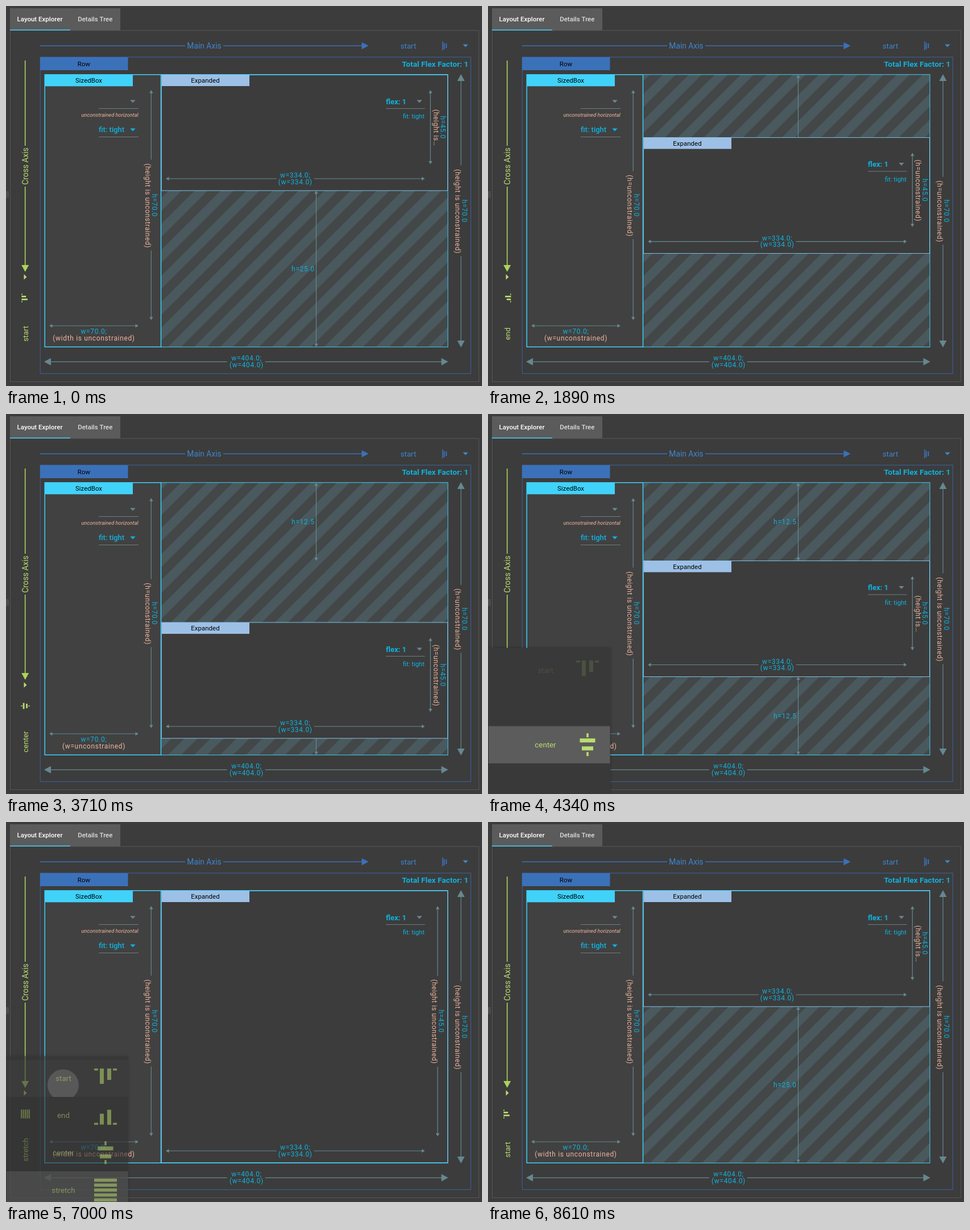
Recreate the animation shown at these times as an HTML page with a canvas. Size 837 by 669 pixels, loop 8.68 s.

```html
<!DOCTYPE html>
<html lang="en">
<head>
<meta charset="utf-8">
<title>Layout Explorer</title>
<style>
html, body { margin: 0; width: 100%; height: 100%; overflow: hidden; background: #3c3c3c; }
canvas { display: block; width: 837px; height: 669px; }
</style>
</head>
<body>
<canvas id="stage" width="837" height="669"></canvas>
<script>
const ctx = document.getElementById('stage').getContext('2d');
const LOOP = 8680, BEAT = 70, CHANGE = 400, MENU = 300;
const BG = '#3c3c3c', BLUE = '#3b71b9', AXIS = '#3d86cf', CYAN = '#0fb2de', BRIGHT = '#3fd0f8',
  SLATE = '#668890', PEACH = '#efb59e', GREEN = '#aad35c', LIME = '#badd70', EDGE = '#7cc3e9';
const TOP = 121, BOTTOM = 600, CHILD = 204, GAP = BOTTOM - TOP - CHILD;

const options = ['start', 'end', 'center', 'stretch'];
const spans = [[TOP, TOP + CHILD], [TOP + GAP, BOTTOM], [TOP + GAP / 2, BOTTOM - GAP / 2], [TOP, BOTTOM]];
// each step: menu opens, an option is tapped, the layout moves
const steps = [
  { open: 445, tap: 1390, move: 1704, from: 0, to: 1 },
  { open: 2300, tap: 3250, move: 3560, from: 1, to: 2 },
  { open: 4157, tap: 5105, move: 5414, from: 2, to: 3 },
  { open: 6010, tap: 6964, move: 7275, from: 3, to: 0 }
];

const clamp = v => Math.max(0, Math.min(1, v));
const ramp = (v, a, b) => clamp((v - a) / (b - a));
const mix = (a, b, k) => a + (b - a) * k;
const ease = x => x < .5 ? 4 * x ** 3 : 1 - (2 - 2 * x) ** 3 / 2;

function rect(x0, y0, x1, y1, color) {
  ctx.fillStyle = color;
  ctx.fillRect(x0, y0, x1 - x0, y1 - y0);
}

function frame(x0, y0, x1, y1, color, w = 1) {
  ctx.strokeStyle = color;
  ctx.lineWidth = w;
  ctx.strokeRect(x0, y0, x1 - x0, y1 - y0);
}

function line(x0, y0, x1, y1, color, w = 1.2) {
  ctx.strokeStyle = color;
  ctx.lineWidth = w;
  ctx.beginPath();
  ctx.moveTo(x0, y0);
  ctx.lineTo(x1, y1);
  ctx.stroke();
}

// triangle with its tip at x, y, pointing along dx, dy
function tip(x, y, dx, dy, len, half, color) {
  const bx = x - dx * len, by = y - dy * len;
  ctx.fillStyle = color;
  ctx.beginPath();
  ctx.moveTo(x, y);
  ctx.lineTo(bx - dy * half, by + dx * half);
  ctx.lineTo(bx + dy * half, by - dx * half);
  ctx.fill();
}

const caret = (x, y, color) => tip(x, y + 2.5, 0, 1, 5, 4.7, color);

function text(s, x, y, size, color, { align = 'center', weight = 400, style = '', space = 0, turn = 0 } = {}) {
  ctx.save();
  ctx.translate(x, y);
  ctx.rotate(turn * Math.PI / 2);
  ctx.font = `${style} ${weight} ${size}px Roboto, sans-serif`;
  ctx.letterSpacing = space + 'px';
  ctx.textAlign = align;
  ctx.fillStyle = color;
  ctx.fillText(s, 0, size * .36);
  ctx.restore();
}

const dim = (s, x, y, color, turn = 0) => text(s, x, y, 12, color, { space: .65, turn });

function dimWidth(s) {
  ctx.font = '400 12px Roboto, sans-serif';
  ctx.letterSpacing = '.65px';
  return ctx.measureText(s).width;
}

// double arrow with an optional gap around its middle
function vArrow(x, y0, y1, gap = 0, big = false) {
  const [len, half] = big ? [12, 6.5] : [5.5, 3.3], mid = (y0 + y1) / 2;
  line(x, y0 + 3, x, mid - gap, SLATE);
  line(x, mid + gap, x, y1 - 3, SLATE);
  tip(x, y0, 0, -1, len, half, SLATE);
  tip(x, y1, 0, 1, len, half, SLATE);
}

function hArrow(x0, x1, y, gap = 0, big = false) {
  const [len, half] = big ? [12, 6.5] : [5.5, 3.3], mid = (x0 + x1) / 2;
  line(x0 + 3, y, mid - gap, y, SLATE);
  line(mid + gap, y, x1 - 3, y, SLATE);
  tip(x0, y, -1, 0, len, half, SLATE);
  tip(x1, y, 1, 0, len, half, SLATE);
}

function vLabel(x, y, size, note) {
  dim('h=' + size, x + 6.5, y, CYAN, 1);
  dim(note, x - 6, y + .7, PEACH, 1);
}

function hLabel(x, y, size, note, color) {
  dim(`w=${size};`, x, y - 6, CYAN);
  dim(note, x, y + 5.7, color);
}

// icons on a 40 unit square, centred at 0, 0
const icons = [
  [[-20, -17, 7, 3.5], [13, -17, 7, 3.5], [-10, -17, 7, 27], [3, -17, 7, 20]],
  [[-20, 13, 7, 3.5], [13, 13, 7, 3.5], [-10, -3, 7, 19], [3, -10, 7, 26.5]],
  [[-1.8, -20, 3.6, 7], [-1.8, 13, 3.6, 7], [-13.5, -11, 27, 7], [-10, 3, 20, 7]],
  [0, 1, 2, 3, 4].map(i => [-20, -20 + i * 8.7, 40, 5.5])
];

function icon(kind, x, y, scale, turn, color) {
  ctx.save();
  ctx.translate(x, y);
  ctx.rotate(turn * Math.PI / 2);
  ctx.scale(scale, scale);
  ctx.fillStyle = color;
  for (const bar of icons[kind]) ctx.fillRect(...bar);
  ctx.restore();
}

function chrome() {
  rect(0, 0, 837, 669, BG);
  frame(7.5, 43, 831.5, 661.5, '#565656');
  rect(7, 4, 201, 43, '#5b5b5b');
  rect(7, 41.5, 113, 43, BRIGHT);
  text('Layout Explorer', 59.5, 23, 11.5, '#fff', { weight: 500 });
  text('Details Tree', 156.8, 23, 11.5, '#dedede', { weight: 500 });
  rect(0, 326, 1, 338, '#6a6a6a');
  rect(3, 326, 4, 338, '#6a6a6a');
}

function mainAxis() {
  line(60, 70, 315, 70, BLUE, 1.6);
  line(382, 70, 627, 70, BLUE, 1.6);
  tip(637.5, 70, 1, 0, 12, 6.3, BLUE);
  text('Main Axis', 348.5, 70, 13.8, AXIS);
  text('start', 707.5, 70, 13.2, AXIS);
  rect(767, 62, 768.5, 78, BLUE);
  rect(769.5, 65, 771.5, 76, BLUE);
  rect(773.3, 66, 775.3, 74, BLUE);
  caret(808, 70, AXIS);
}

function crossAxis(kind) {
  line(33.7, 96, 33.7, 246, GREEN, 1.6);
  line(33.7, 318, 33.7, 458, GREEN, 1.6);
  tip(33.7, 468, 0, 1, 12, 6.5, GREEN);
  text('Cross Axis', 34, 282, 13.8, LIME, { turn: -1 });
  tip(36.5, 477, 1, 0, 5, 4.7, LIME);
  icon(kind, 34, 514, .39, -1, LIME);
  text(options[kind], 34, 577, 13.3, LIME, { turn: -1 });
}

function row(note) {
  frame(60.2, 90, 817.2, 647.2, '#3864a3');
  rect(60, 90, 214.5, 113, BLUE);
  text('Row', 137, 101.7, 11.5, '#000');
  text('Total Flex Factor: 1', 813, 101.7, 13.7, CYAN, { align: 'right', weight: 700 });
  vArrow(800, 120, 601, dimWidth(note) / 2 + 5.5, true);
  vLabel(800, 361, '70.0', note);
  hArrow(67, 777.5, 626.3, 33.5, true);
  hLabel(423, 626, '404.0', '(w=404.0)', CYAN);
}

function sizedBox(note, wide) {
  rect(68, 121, 272, 600, '#414141');
  frame(68.2, 120.8, 272.5, 600.2, BRIGHT, 1.5);
  rect(68, 121, 223, 141.3, '#40d2f9');
  text('SizedBox', 145.5, 131.3, 11.5, '#000');
  caret(223, 168, SLATE);
  rect(163, 180, 233, 181, '#6d7c80');
  text('unconstrained horizontal', 182.7, 191.7, 9.4, PEACH, { style: 'italic' });
  text('fit: tight', 163, 217.7, 13, CYAN, { align: 'left', weight: 500 });
  caret(223, 218, CYAN);
  rect(163, 230, 233, 231, '#6d7c80');
  vArrow(255.3, 148, 553, dimWidth(note) / 2 + 5.5);
  vLabel(255.3, 351, '70.0', note);
  hArrow(76, 233, 563);
  hLabel(154.5, 579, '70.0', wide, PEACH);
}

function stripes() {
  ctx.save();
  ctx.beginPath();
  ctx.rect(273, TOP, 504, BOTTOM - TOP);
  ctx.clip();
  rect(273, TOP, 777, BOTTOM, '#434748');
  const pitch = 45.7;
  for (let s = 394; s < 1420; s += pitch) line(s - 90, 90, s - 640, 640, '#4a595d', pitch / 2 / Math.SQRT2);
  ctx.restore();
  frame(272.5, TOP - .3, 777, BOTTOM + .3, BRIGHT);
}

function freeSpace(kind) {
  const [a, b] = spans[kind];
  for (const [y0, y1] of [[TOP, a], [b, BOTTOM]]) {
    if (y1 - y0 < 1) continue;
    vArrow(545.5, y0, y1);
    dim('h=' + (kind === 2 ? '12.5' : '25.0'), 522.3, (y0 + y1) / 2, CYAN);
  }
}

function expanded(top, bottom, note, moving) {
  rect(273, top, 776.5, bottom, BG);
  frame(273.3, top, 776.5, bottom, EDGE);
  if (top < TOP + 1) line(273, TOP - .2, 777, TOP - .2, BRIGHT, 1.5);
  if (bottom > BOTTOM - 1) line(273, BOTTOM + .2, 777, BOTTOM + .2, BRIGHT, 1.5);
  rect(274, top, 428, top + 20, '#9dc0e6');
  text('Expanded', 350.5, top + 10.2, 11.5, '#000');
  text('flex: 1', 668, top + 47, 13, CYAN, { align: 'left', weight: 700 });
  caret(727, top + 47, SLATE);
  rect(668, top + 59, 736.5, top + 60, '#6d7c80');
  text('fit: tight', 736, top + 73, 11.3, CYAN, { align: 'right' });
  const y0 = top + 27, y1 = bottom - 46.5, mid = (y0 + y1) / 2;
  if (bottom - top > 235) {
    vArrow(759, y0, y1, dimWidth(note) / 2 + 5.5);
    vLabel(759.3, mid, '45.0', note);
  } else {
    vArrow(746.3, y0, y1);
    vLabel(762, mid + .4, '45.0', moving ? note : '(height is…');
  }
  hArrow(281, 736.5, bottom - 21, 33);
  hLabel(508.7, bottom - 21.2, '334.0', '(w=334.0)', CYAN);
}

function menu(step, t) {
  const rowTop = i => 418.5 + i * 65.5;
  const v = clamp((t - step.open) / MENU);
  const back = 1 - clamp((t - step.tap) / MENU);
  const closing = t > step.tap;
  const alpha = closing ? ramp(back, .75, 1) : ramp(v, 0, .25);
  if (t < step.open || alpha <= 0) return;
  const grow = closing ? 1 : ramp(v, .25, .5);
  const y0 = mix(rowTop(step.from), 412, grow);
  const y1 = mix(rowTop(step.from + 1), 688, grow);

  ctx.save();
  ctx.globalAlpha = alpha;
  ctx.shadowColor = 'rgba(0,0,0,.3)';
  ctx.shadowBlur = 5;
  ctx.fillStyle = '#393939';
  ctx.beginPath();
  ctx.roundRect(-1, y0, 216, y1 - y0, 2.5);
  ctx.fill();
  ctx.shadowColor = 'transparent';
  ctx.clip();

  rect(1, rowTop(step.from), 214.5, rowTop(step.from + 1), '#5c5c5c');
  // pointer resting on the row about to be tapped
  if (t > step.tap - 500) rect(1, rowTop(step.to), 214.5, rowTop(step.to + 1), 'rgba(255,255,255,.05)');
  ripple(step, t, rowTop(step.to));
  options.forEach((name, i) => {
    const unit = .5 / 5.5, from = .5 + (i + 1) * unit;
    const shown = i === step.from || closing ? 1 : ramp(v, from, Math.min(1, from + 1.5 * unit));
    const y = 451 + i * 65.6;
    ctx.globalAlpha = alpha * shown;
    text(name, 101, y, 13.3, LIME);
    icon(i, 175, y, 1, 0, LIME);
  });
  ctx.restore();
}

function ripple(step, t, y) {
  const k = (t - step.tap + 70) / 106;
  if (k <= 0) return;
  ctx.save();
  ctx.beginPath();
  ctx.rect(0, y, 214.5, 65.5);
  ctx.clip();
  ctx.fillStyle = 'rgba(205,205,205,.36)';
  ctx.beginPath();
  ctx.arc(100.5, y + 44.5, 27.5 * k, 0, 7);
  ctx.fill();
  ctx.restore();
}

function draw(t) {
  const last = steps.filter(s => t >= s.move).pop();
  const kind = last ? last.to : 0;
  const part = last ? clamp((t - last.move) / CHANGE) : 1;
  const moving = part < 1;
  const old = spans[last ? last.from : 0], now = spans[kind];
  const [top, bottom] = now.map((y, i) => mix(old[i], y, ease(part)));
  const note = moving ? '(h=unconstrained)' : '(height is unconstrained)';
  const wide = moving ? '(w=unconstrained)' : '(width is unconstrained)';

  chrome();
  mainAxis();
  crossAxis(kind);
  row(note);
  stripes();
  freeSpace(kind);
  sizedBox(note, wide);
  expanded(top, bottom, note, moving);
  for (const step of steps) menu(step, t);
}

// the picture advances in even beats
const begin = performance.now();
function tick() {
  const t = (performance.now() - begin) % LOOP;
  draw(Math.floor(t / BEAT) * BEAT);
  requestAnimationFrame(tick);
}
tick();
</script>
</body>
</html>
```
